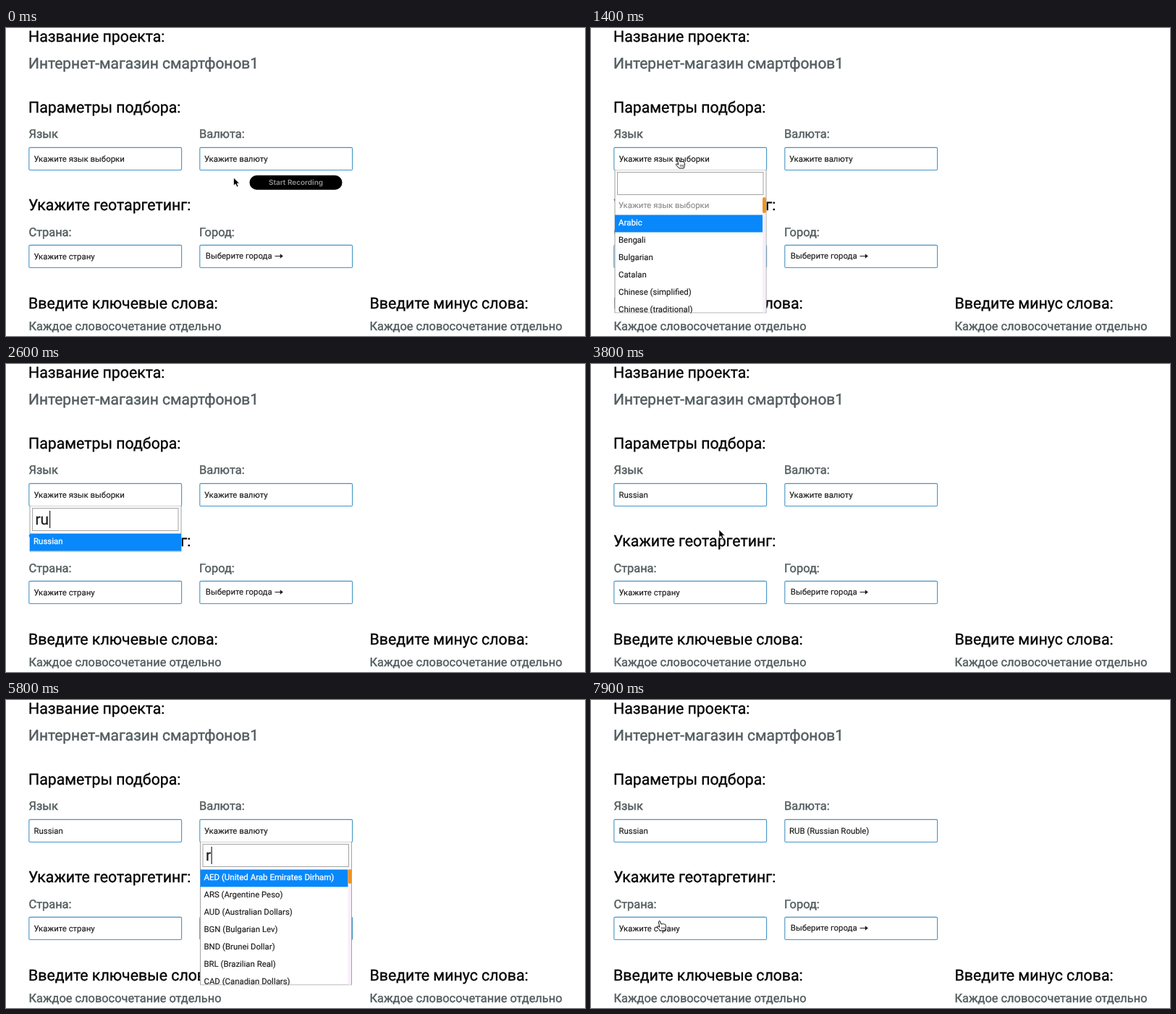
An HTML page for the animation above (8000 ms loop, 800 by 426 pixels).

```html
<!DOCTYPE html>
<html lang="ru">
<head>
<meta charset="utf-8">
<title>Параметры подбора</title>
<style>
  html, body { margin: 0; width: 100%; height: 100%; overflow: hidden; background: #fff; }
  svg { display: block; width: 100vw; height: 100vh; }
  text { font-family: Roboto, "Open Sans", sans-serif; text-rendering: geometricPrecision; white-space: pre; }
  .head { font-size: 21.3px; fill: #050505; stroke: #050505; stroke-width: .35px; }
  .name { font-size: 20.95px; fill: #545d5f; stroke: #545d5f; stroke-width: .45px; }
  .label { font-size: 16.4px; fill: #545d5f; stroke: #545d5f; stroke-width: .45px; }
  .small { font-size: 11.4px; fill: #1c1c1c; stroke: #1c1c1c; stroke-width: .15px; }
  .hint { font-size: 11.4px; fill: #8c8c8c; stroke: #8c8c8c; stroke-width: .15px; }
  .active { font-size: 11.5px; fill: #fff; stroke: #fff; stroke-width: .3px; }
  .query { font-size: 21px; fill: #222; stroke: #222; stroke-width: .3px; }
  .pill { font: 600 10px Inter, sans-serif; fill: #929292; }
  .field { fill: #fff; stroke: #4695c5; stroke-width: 1.1px; }
</style>
</head>
<body>
<svg viewBox="0 0 800 426">
  <defs>
    <clipPath id="listClip"><rect x="0" y="196" width="800" height="198.5"/></clipPath>
    <g id="arrow">
      <path d="M0 0V11L2.6 8.7L4.5 12.8L6.5 11.9L4.7 8H8Z" fill="#000" stroke="#fff" stroke-width=".7"/>
    </g>
    <g id="hand" stroke="#111" stroke-width="1" stroke-linejoin="round">
      <path d="M-1.6 .7Q-1.2-.9.3-.3L2 4.2Q3.2 2.8 4.3 4Q5.5 2.9 6.4 4.2Q7.7 3.6 8.2 5.3L8.4 9.5L7.2 13H.8L-3.4 8.5Q-4 6.6-2.2 6.9L-.3 8.2Z" fill="#fff"/>
      <path d="M2.4 8V11M4.4 8V11M6.3 8V11" fill="none" stroke-width=".7"/>
    </g>
    <g id="beam" fill="none" stroke="#222" stroke-width="1.1">
      <path d="M-2.6-5.6Q0-5.6 0-4V4.5Q0 6-2.6 6M2.6-5.6Q0-5.6 0-4M0 4.5Q0 6 2.6 6M-1.6 2.5H1.6"/>
    </g>
  </defs>
  <g id="page"></g>
  <g id="live"></g>
</svg>
<script>
const LOOP = 8000, STEP = 100;
const page = document.getElementById('page');
const live = document.getElementById('live');

const text = (cls, x, y, s) => `<text class="${cls}" x="${x}" y="${y}">${s}</text>`;
const rect = (x, y, w, h, attrs) => `<rect x="${x}" y="${y}" width="${w}" height="${h}" ${attrs}/>`;
const field = (x, y) => rect(x + .8, y + .4, 210.8, 31.1, 'rx="1.5" class="field"');

const menus = [
  {
    x: 33, fieldX: 38.5, hint: 'Укажите язык выборки', open: 900, close: 3300,
    typed: [[2200, 'r'], [2500, 'ru']], value: 'Russian',
    items: ['Arabic', 'Bengali', 'Bulgarian', 'Catalan', 'Chinese (simplified)',
      'Chinese (traditional)', 'Croatian', 'Czech', 'Danish', 'Dutch', 'English',
      'French', 'German', 'Greek', 'Hebrew', 'Hungarian', 'Korean', 'Russian']
  },
  {
    x: 268.5, fieldX: 274, hint: 'Укажите валюту', open: 4700, close: 7300,
    typed: [[5700, 'r'], [6100, 'ru'], [6400, 'rub']], value: 'RUB (Russian Rouble)',
    items: ['AED (United Arab Emirates Dirham)', 'ARS (Argentine Peso)',
      'AUD (Australian Dollars)', 'BGN (Bulgarian Lev)', 'BND (Brunei Dollar)',
      'BOB (Bolivian Boliviano)', 'BRL (Brazilian Real)', 'CAD (Canadian Dollars)',
      'CHF (Swiss Francs)', 'EUR (Euro)', 'RUB (Russian Rouble)']
  }
];

// time, x, y of the pointer hotspot
const path = [
  [0, 314.5, 207], [100, 314.5, 207], [700, 121, 181], [2800, 121, 181], [3200, 110, 246],
  [3500, 110, 246], [4400, 368, 181], [6800, 368, 181], [7000, 361, 229],
  [7200, 345, 246], [7300, 345, 246], [7800, 95, 306], [LOOP, 95, 306]
];
const clicks = [[800, 1000], [3200, 3400], [4600, 4800], [7200, 7400]];
const hidden = [[2000, 2800], [5400, 6800]];
const within = (spans, t) => spans.some(([a, b]) => t >= a && t < b);
const isOpen = (m, t) => t >= m.open && t < m.close;

function pointerAt(t) {
  const i = path.findIndex((p, n) => n && t <= p[0]);
  const [t0, x0, y0] = path[i - 1], [t1, x1, y1] = path[i];
  const k = (t - t0) / (t1 - t0), e = k * k * (3 - 2 * k);
  return [x0 + (x1 - x0) * e, y0 + (y1 - y0) * e];
}

function drawMenu(m, t) {
  const keys = m.typed.filter(([at]) => at <= t);
  const [since, query] = keys.length ? keys[keys.length - 1] : [m.open, ''];
  const found = m.items.filter(s => s.toLowerCase().includes(query));
  const rows = query ? found : [m.hint, ...found];
  const active = query ? 0 : 1;
  const bottom = Math.min(394, 235 + rows.length * 24);
  const long = bottom === 394;
  const x = m.x;

  let out = rect(x, 196, 209, bottom - 196, 'fill="#fff" stroke="#a2a2a2" stroke-width="1"');
  out += rect(x + 3.5, 199.5, 201.5, 31, 'fill="#fff" stroke="#a3a3a3"');
  if (long) out += rect(x + 204, 235, 4.5, 158.5, 'fill="#f7effa"');
  rows.forEach((s, i) => {
    const y = 234.5 + i * 24;
    if (y >= 394) return;
    if (i === active) out += rect(x, y, long ? 204 : 209, 24, 'fill="#0888fb"');
    const cls = i === active ? 'active' : i < active ? 'hint' : 'small';
    out += text(cls, x + 5, y + 14.8, s);
  });
  if (long) out += rect(x + 204, 234, 5, query ? 20 : 22, 'rx="2.5" fill="#f39322"');
  out += text('query', x + 7.5, 222, query);
  if ((t - since) % 1000 < 500) {
    const width = [0, 7.5, 19.5, 31.5][query.length];
    out += rect(x + 7.5 + width, 203, 1.2, 24, 'fill="#222"');
  }
  return `<g clip-path="url(#listClip)">${out}</g>`;
}

function drawPointer(t) {
  if (within(hidden, t)) return '';
  const [x, y] = pointerAt(t);
  const menu = menus.find(m => isOpen(m, t));
  const inField = x > 31 && x < 479 && !(x > 243 && x < 267) &&
    ((y > 165 && y < 197) || (y > 300 && y < 332));
  const inMenu = menu && x > menu.x && x < menu.x + 209;
  let kind = 'arrow';
  if (inMenu && y >= 197 && y < 234) kind = 'beam';
  else if (inField || (inMenu && y >= 234)) kind = 'hand';
  const ring = within(clicks, t)
    ? `<circle cx="${x}" cy="${y}" r="23.3" fill="none" stroke="#111" stroke-width="2.4"/>` : '';
  return ring + `<use href="#${kind}" x="${x}" y="${y}"/>`;
}

function drawPill(t) {
  const alpha = 1 - t / 400;
  if (alpha <= 0) return '';
  return `<g opacity="${alpha}">` + rect(336.5, 203.7, 128, 20, 'rx="10" fill="#000"') +
    '<text class="pill" x="400.5" y="217" text-anchor="middle">Start Recording</text></g>';
}

function draw(t) {
  let out = '';
  for (const m of menus) {
    out += text('small', m.fieldX, 184.8, t >= m.close ? m.value : m.hint);
  }
  for (const m of menus) if (isOpen(m, t)) out += drawMenu(m, t);
  live.innerHTML = out + drawPill(t) + drawPointer(t);
}

page.innerHTML = [
  text('head', 31, 19, 'Название проекта:'),
  text('name', 31, 56, 'Интернет-магазин смартфонов1'),
  text('head', 31, 117, 'Параметры подбора:'),
  text('label', 31.5, 151.7, 'Язык'),
  text('label', 267, 151.7, 'Валюта:'),
  text('head', 31, 252.3, 'Укажите геотаргетинг:'),
  text('label', 31.5, 287.5, 'Страна:'),
  text('label', 267, 287.5, 'Город:'),
  field(31, 165), field(267, 165), field(31, 300), field(267, 300),
  text('small', 38.5, 320.3, 'Укажите страну'),
  text('small', 275.8, 319.3, 'Выберите города'),
  '<path d="M371.5 315.5H381M379.3 313.4L382 315.5L379.3 317.6Z" fill="#1c1c1c" stroke="#1c1c1c" stroke-width="1.1"/>',
  text('head', 31, 388, 'Введите ключевые слова:'),
  text('label', 31.5, 418.3, 'Каждое словосочетание отдельно'),
  text('head', 502.5, 388, 'Введите минус слова:'),
  text('label', 502.5, 418.3, 'Каждое словосочетание отдельно')
].join('');

const start = performance.now();
let last = -1;
function tick() {
  const t = Math.floor(((performance.now() - start) % LOOP) / STEP) * STEP;
  if (t !== last) draw(last = t);
  requestAnimationFrame(tick);
}
tick();
</script>
</body>
</html>
```
